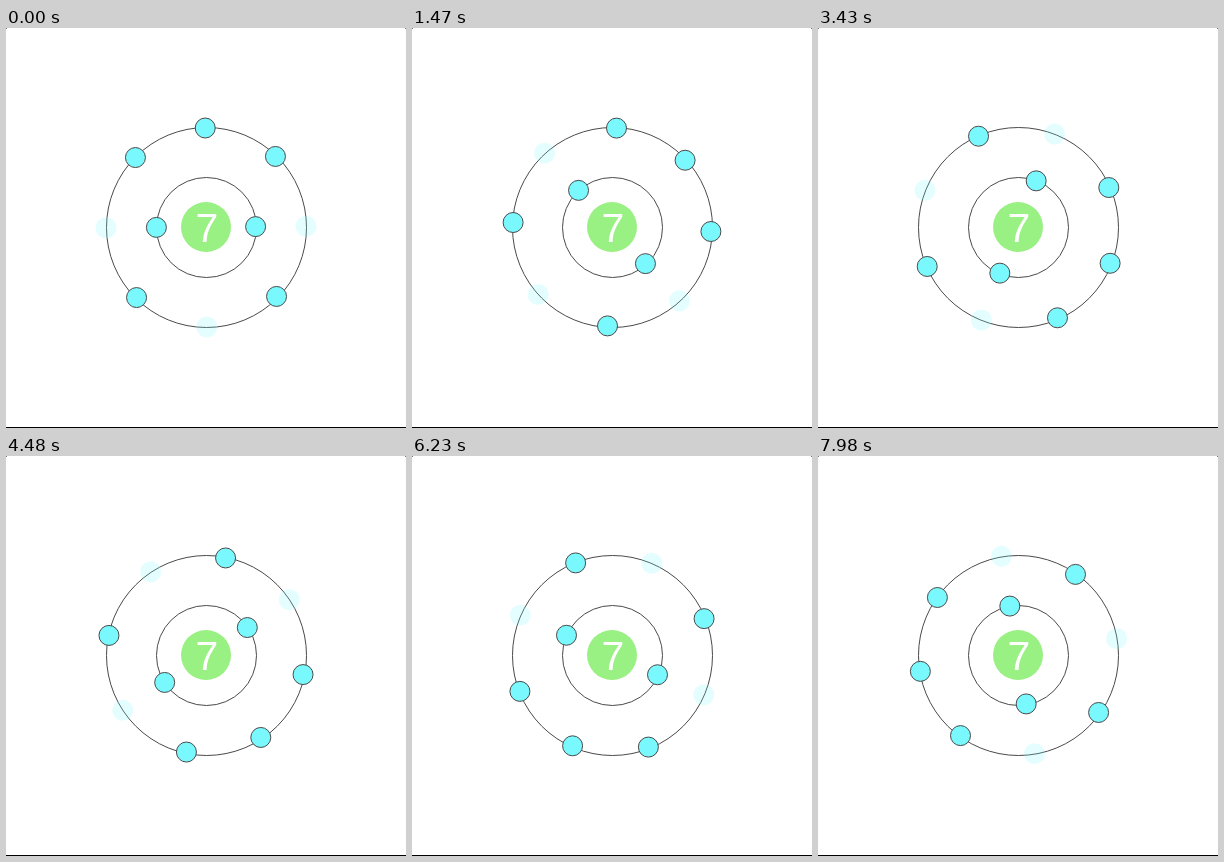
These frames come from a looping animation (400x400 px, 8 s). An HTML page with a canvas:

```html
<!DOCTYPE html>
<html lang="en">
<head>
<meta charset="utf-8">
<title>Electron shells</title>
<style>
  html, body { margin: 0; width: 100%; height: 100%; overflow: hidden; background: #fff; }
  canvas { display: block; width: 400px; height: 400px; }
</style>
</head>
<body>
<canvas id="stage"></canvas>
<script>
const LOOP = 8000, STEP = 70;
const LINE = '#4a4a4a', CYAN = '#79f8fe', GREEN = '#99f083';
const CX = 200, CY = 199;
const INNER = [0, 180];
const FILLED = [45, 135, 225, 270, 315];
const EMPTY = [0, 90, 180];
// [ms, degrees]: a nearly constant turn with slight drift
const TURN = [[0, -0.45], [1470, 47.6], [3430, 111.5], [4480, 146.4],
              [5530, 181], [6930, 225.9], [7980, 260.5]];

const canvas = document.getElementById('stage');
const ctx = canvas.getContext('2d');
const ratio = window.devicePixelRatio || 1;
canvas.width = canvas.height = 400 * ratio;
ctx.scale(ratio, ratio);

function turnAt(t) {
  let i = 1;
  while (i < TURN.length - 1 && t > TURN[i][0]) i++;
  const [t0, a0] = TURN[i - 1], [t1, a1] = TURN[i];
  return a0 + (a1 - a0) * (t - t0) / (t1 - t0);
}

function disc(x, y, r, fill, stroke) {
  ctx.beginPath();
  ctx.arc(x, y, r, 0, Math.PI * 2);
  if (fill) { ctx.fillStyle = fill; ctx.fill(); }
  if (stroke) { ctx.strokeStyle = stroke; ctx.lineWidth = 1; ctx.stroke(); }
}

function electrons(slots, turn, orbit, r, stroke) {
  for (const slot of slots) {
    const a = (slot + turn) * Math.PI / 180;
    disc(CX + orbit * Math.cos(a), CY + orbit * Math.sin(a), r, CYAN, stroke);
  }
}

function drawFrame() {
  ctx.fillStyle = '#000';
  ctx.fillRect(0, 399, 400, 1);
  ctx.fillStyle = '#777';
  ctx.fillRect(0, 0, 1, 1);
  ctx.fillRect(399, 0, 1, 1);
}

function draw(t) {
  const turn = turnAt(t);
  ctx.fillStyle = '#fff';
  ctx.fillRect(0, 0, 400, 400);
  drawFrame();

  disc(CX + 0.5, CY + 0.5, 100, null, LINE);
  disc(CX + 0.5, CY + 0.5, 50, null, LINE);

  disc(CX, CY, 25, GREEN);
  ctx.fillStyle = '#fff';
  ctx.font = '41px "Liberation Sans", Arial, sans-serif';
  ctx.textAlign = 'center';
  ctx.fillText('7', 201, 214);

  ctx.globalAlpha = 0.2;
  electrons(EMPTY, turn, 100, 10.5);
  ctx.globalAlpha = 1;
  electrons(FILLED, turn, 99, 10, LINE);
  electrons(INNER, turn, 49.6, 10, LINE);
}

function tick() {
  const t = performance.now() % LOOP;
  draw(Math.floor(t / STEP) * STEP);
  requestAnimationFrame(tick);
}
tick();
</script>
</body>
</html>
```
